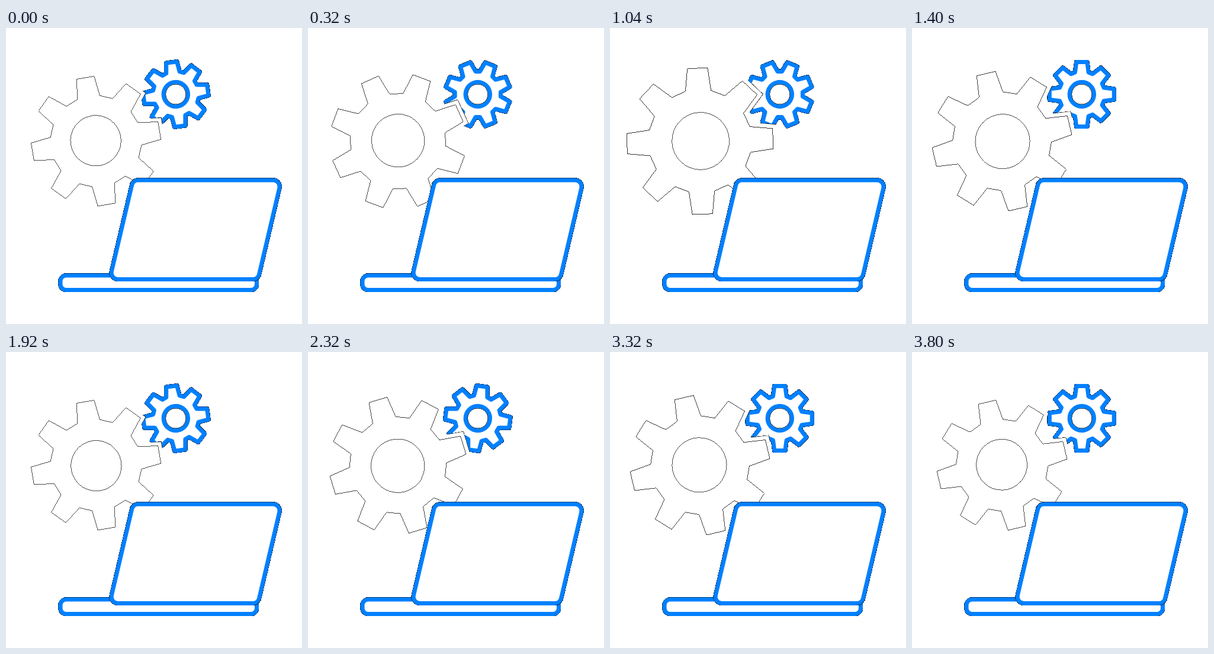
Recreate the animation shown at these times as an HTML page. Size 500 px wide and 500 px high, loop 3.84 s.

```html
<!DOCTYPE html>
<html lang="en">
<head>
<meta charset="utf-8">
<title>Laptop and gears</title>
<style>
  html, body { margin: 0; width: 100%; height: 100%; overflow: hidden; background: #fff; }
  svg { display: block; width: 100vw; height: 100vh; }
  .edge { fill: none; stroke: #000; stroke-width: 7.8; stroke-linejoin: round; shape-rendering: crispEdges; }
  .line { fill: none; stroke: #0080ff; stroke-width: 7; stroke-linejoin: round; }
  .fill { fill: #fff; }
  .hair { fill: none; stroke: #000; stroke-width: .7; vector-effect: non-scaling-stroke; shape-rendering: crispEdges; }
  .halo { fill: #fff; stroke: #fff; stroke-width: 12.5; }
  .rim { fill: none; stroke: #000; stroke-width: 13.8; shape-rendering: crispEdges; }
  .solid { fill: #fff; stroke: #fff; stroke-width: 7; stroke-linejoin: round; }
</style>
</head>
<body>
<svg viewBox="0 0 500 500">
  <defs>
    <path id="big"/>
    <path id="small"/>
    <rect id="base" x="92" y="418" width="331.5" height="24.5" rx="9.5"/>
    <path id="screen"/>
    <mask id="overlap" maskUnits="userSpaceOnUse" x="0" y="0" width="500" height="500">
      <use href="#small" class="solid turnSmall"/>
    </mask>
  </defs>

  <g class="turnSmall">
    <use href="#small" class="edge"/>
    <use href="#small" class="fill"/>
    <use href="#small" class="line"/>
    <circle class="line" r="20.7"/>
    <circle class="hair" r="17"/>
  </g>

  <g mask="url(#overlap)">
    <use href="#big" class="rim turnBig"/>
  </g>
  <g class="turnBig">
    <use href="#big" class="halo"/>
    <use href="#big" class="hair"/>
    <circle class="hair" cx="-.2" cy="-1" r="42.7"/>
  </g>

  <use href="#base" class="edge"/>
  <use href="#base" class="fill"/>
  <use href="#base" class="line"/>
  <use href="#screen" class="edge"/>
  <use href="#screen" class="fill"/>
  <use href="#screen" class="line"/>
</svg>
<script>
const LOOP = 3840, STEP = 40, TEETH = 8;

// Straight-sided gear: half angles in degrees for tooth tip and root.
function gearPath(tipR, tipA, rootR, rootA) {
  const points = [];
  for (let i = 0; i < TEETH; i++) {
    for (const [r, a] of [[rootR, -rootA], [tipR, -tipA], [tipR, tipA], [rootR, rootA]]) {
      const angle = (i * 360 / TEETH + a) * Math.PI / 180;
      points.push((r * Math.sin(angle)).toFixed(2) + ' ' + (-r * Math.cos(angle)).toFixed(2));
    }
  }
  return 'M' + points.join('L') + 'Z';
}

// Polygon whose corners are replaced by arcs of radius r.
function roundedPath(corners, r) {
  const n = corners.length;
  const toward = (p, q, d) => {
    const k = d / Math.hypot(q[0] - p[0], q[1] - p[1]);
    return [p[0] + (q[0] - p[0]) * k, p[1] + (q[1] - p[1]) * k];
  };
  return corners.map((p, i) => {
    const a = corners[(i + n - 1) % n], b = corners[(i + 1) % n];
    const turn = Math.abs(Math.atan2(a[1] - p[1], a[0] - p[0]) - Math.atan2(b[1] - p[1], b[0] - p[0]));
    const cut = r / Math.tan(Math.min(turn, 2 * Math.PI - turn) / 2);
    return `${i ? 'L' : 'M'}${toward(p, a, cut)}A${r} ${r} 0 0 1 ${toward(p, b, cut)}`;
  }).join('') + 'Z';
}

const setPath = (id, d) => document.getElementById(id).setAttribute('d', d);
setPath('big', gearPath(109.7, 7.9, 77.2, 14.3));
setPath('small', gearPath(55.2, 9.4, 38.8, 17));
setPath('screen', roundedPath([[214.6, 257], [465, 257], [425.6, 424.5], [175.2, 424.5]], 11));

const place = (name, transform) =>
  document.querySelectorAll('.' + name).forEach(el => el.setAttribute('transform', transform));

function draw() {
  const t = Math.floor(performance.now() % LOOP / STEP) * STEP;
  const pulse = 1 - Math.abs(t % 1920 / 960 - 1);
  place('turnBig', `translate(152 191.2) rotate(${t * 360 / LOOP - 9.5}) scale(${1 + .147 * pulse})`);
  place('turnSmall', `translate(286.8 112) rotate(${-(t + STEP) * 720 / LOOP})`);
  requestAnimationFrame(draw);
}
draw();
</script>
</body>
</html>
```
